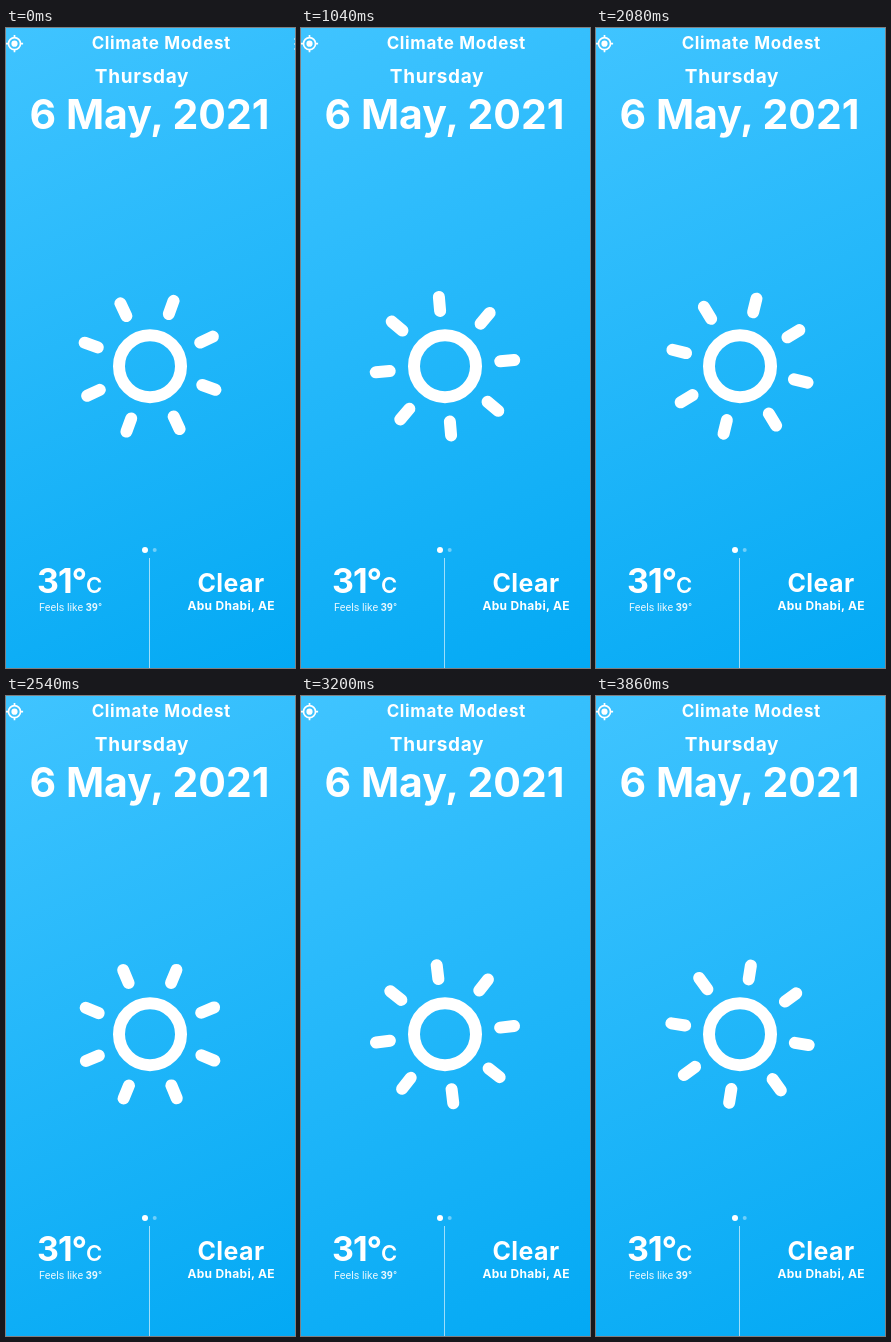
These frames come from a looping animation (289x640 px, 3920 ms). An HTML page:

```html
<!DOCTYPE html>
<html lang="en">
<head>
<meta charset="utf-8">
<title>Weather screen</title>
<style>
  html, body { margin: 0; width: 100%; height: 100%; overflow: hidden; }
  body { background: linear-gradient(155.7deg, #40c4ff, #03a9f4); }
  svg { display: block; width: 289px; height: 640px; }
  text { fill: #fff; font-family: Montserrat, Inter, sans-serif; font-weight: 700; }
  .mid { text-anchor: middle; }
  .small { font-family: Roboto, sans-serif; font-weight: 400; font-size: 10.7px; }
  .line { fill: none; stroke: #fff; }
</style>
</head>
<body>
<svg viewBox="0 0 289 640">
  <g transform="translate(8.5 15.7)">
    <circle class="line" r="6" stroke-width="1.7"/>
    <circle r="3.1" fill="#fff"/>
    <path class="line" stroke-width="1.7" d="M0-8.6V-6M0 8.6V6M-8.6 0H-6M8.6 0H6"/>
  </g>
  <path id="menu" class="line" stroke-opacity=".5" d="M288.5 10v2m0 3v2m0 3v2"/>

  <text class="mid" x="155.3" y="21" font-size="17" letter-spacing=".65">Climate Modest</text>
  <text class="mid" x="136" y="55" font-size="19" letter-spacing=".7">Thursday</text>
  <text class="mid" x="143.5" y="101" font-size="41">6 May, 2021</text>

  <g transform="translate(144 338.2)">
    <circle class="line" r="31" stroke-width="12"/>
    <g id="rays" class="line" stroke-width="12" stroke-linecap="round"></g>
  </g>

  <circle cx="139" cy="522" r="3" fill="#fff"/>
  <circle cx="148.7" cy="522" r="2" fill="#fff" fill-opacity=".4"/>
  <path class="line" stroke-opacity=".6" d="M143.5 530V640"/>

  <text x="31" y="565" font-size="34" letter-spacing="-1">31°</text>
  <text x="80" y="565" font-size="22" style="font-weight:600">C</text>
  <text class="small" x="33" y="583" fill-opacity=".9">Feels like <tspan font-weight="700">39°</tspan></text>
  <text class="mid" x="225" y="564" font-size="25" letter-spacing=".4">Clear</text>
  <text class="mid" x="225.2" y="582" font-size="12" letter-spacing=".3">Abu Dhabi, AE</text>
</svg>
<script>
  const LOOP = 3920, START_ANGLE = 19.8, STEP_ANGLE = 1.44;
  const rays = document.getElementById('rays');
  const menu = document.getElementById('menu');

  rays.innerHTML = Array.from({ length: 8 }, (_, i) =>
    `<path d="M0-55.5V-69.5" transform="rotate(${i * 45})"/>`).join('');

  // The sun turns in equal ticks, whose pace changes twice per loop.
  function tickAt(t) {
    if (t < 560) return Math.floor(t / 70);
    if (t < 2480) return 8 + Math.floor((t - 560) / 80);
    return 32 + Math.floor((t - 2480) / 60);
  }

  function draw() {
    const tick = tickAt(performance.now() % LOOP);
    rays.setAttribute('transform', `rotate(${START_ANGLE + tick * STEP_ANGLE})`);
    menu.setAttribute('visibility', tick ? 'hidden' : 'visible');
    requestAnimationFrame(draw);
  }
  draw();
</script>
</body>
</html>
```
